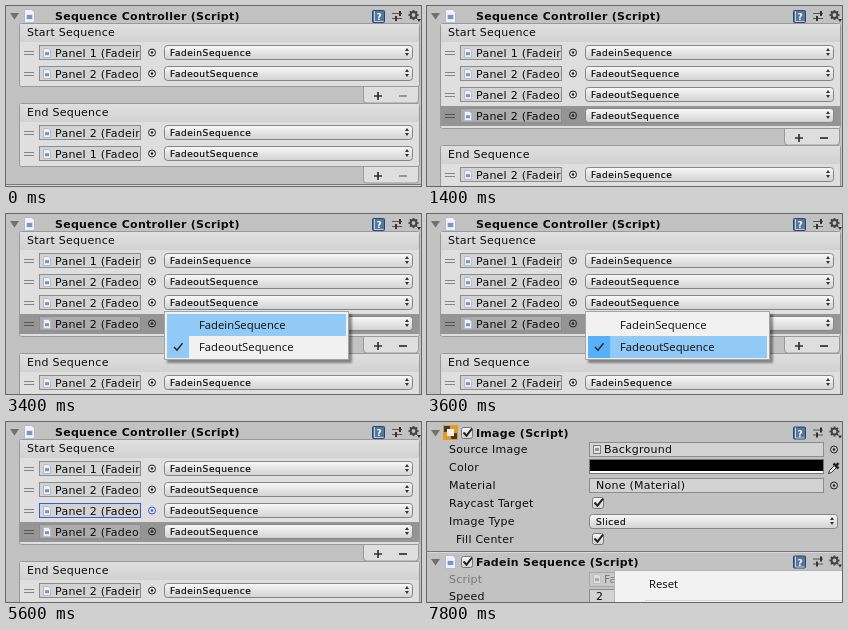
Recreate the animation shown at these times as an HTML page. Size 415 by 180 pixels, loop 8 s.

```html
<!DOCTYPE html>
<html lang="en">
<head>
<meta charset="utf-8">
<title>Sequence inspector</title>
<style>
  html, body { margin: 0; width: 415px; height: 180px; overflow: hidden; background: #c2c2c2; }
  svg { display: block; width: 415px; height: 180px; }
  text { font: 11px "DejaVu Sans", sans-serif; letter-spacing: .25px; fill: #0c0c0c; white-space: pre; }
  .bold { font-weight: bold; letter-spacing: .28px; }
  .small { font-size: 9px; letter-spacing: .55px; stroke: #0c0c0c; stroke-width: .2px; }
  .menu { font: 11.3px "Open Sans", "Noto Sans", sans-serif; letter-spacing: 0; }
  .dim { fill: #777; }
</style>
</head>
<body>
<svg id="stage" viewBox="0 0 415 180" xmlns="http://www.w3.org/2000/svg">
  <defs>
    <linearGradient id="button" x2="0" y2="1">
      <stop offset="0" stop-color="#f8f8f8"/><stop offset="1" stop-color="#d2d2d2"/>
    </linearGradient>
    <linearGradient id="header" x2="0" y2="1">
      <stop offset="0" stop-color="#dfdfdf"/><stop offset="1" stop-color="#d2d2d2"/>
    </linearGradient>
    <clipPath id="fieldClip"><rect x="33" y="0" width="100.5" height="16"/></clipPath>
    <filter id="shadow" x="-10%" y="-20%" width="125%" height="150%">
      <feDropShadow dx="3" dy="3" stdDeviation="1.3" flood-opacity=".4"/>
    </filter>
  </defs>
  <g id="view"></g>
</svg>
<script>
const LOOP = 8000;
const view = document.getElementById('view');

// Each step holds from its time until the next one.
const steps = [
  [0, { rows: 2 }],
  [900, { rows: 3 }],
  [1400, { rows: 4 }],
  [3100, { rows: 4, popup: .7 }],
  [3200, { rows: 4, popup: 1 }],
  [3400, { rows: 4, popup: 1, hover: 0 }],
  [3500, { rows: 4, popup: 1 }],
  [3600, { rows: 4, popup: 1, hover: 1 }],
  [3900, { rows: 4, popup: 1, hover: 0 }],
  [4200, { rows: 4, popup: 1 }],
  [5600, { rows: 4, ping: 2 }],
  [6400, { component: true }],
  [7600, { component: true, context: .4 }],
  [7700, { component: true, context: .8 }],
  [7800, { component: true, context: 1 }]
];

const at = (x, y, body, extra = '') => `<g transform="translate(${x} ${y})" ${extra}>${body}</g>`;
const text = (x, y, s, cls = '') => `<text x="${x}" y="${y}" class="${cls}">${s}</text>`;
const rect = (x, y, w, h, fill, extra = '') =>
  `<rect x="${x}" y="${y}" width="${w}" height="${h}" fill="${fill}" ${extra}/>`;
const box = (x, y, w, h, fill, stroke, r = 0) =>
  rect(x + .5, y + .5, w - 1, h - 1, fill, `stroke="${stroke}" rx="${r}"`);
const path = (d, stroke, width = 1, fill = 'none') =>
  `<path d="${d}" stroke="${stroke}" stroke-width="${width}" fill="${fill}"/>`;

const foldout = (x, y) => path(`M${x} ${y}h9l-4.5 6.5z`, 'none', 0, '#707070');
const picker = (x, y, color = '#222') =>
  `<circle cx="${x}" cy="${y}" r="3.5" fill="none" stroke="${color}"/>` +
  `<circle cx="${x}" cy="${y}" r="1.2" fill="${color}"/>`;
const check = (x, y, color, width = 2) => path(`M${x} ${y}l3 3.2l5.5 -7`, color, width);

function page(x, y, w, h) {
  const s = w / 4;
  return path(`M${x + .5} ${y + .5}h${w - s - 1}l${s} ${s}v${h - s - 1}h${1 - w}z`, '#b4bcc6', 1, '#eef1f5') +
    rect(x + w * .25, y + h * .42, w * .5, h * .3, '#7398c4');
}

function toggle(x, y) {
  return box(x, y, 12, 12, 'url(#button)', '#777', 2) + check(x + 2.5, y + 5.5, '#222');
}

function popupButton(x, y, w, label, indent) {
  const ax = x + w - 6, ay = y + 7;
  return box(x, y, w, 15, 'url(#button)', '#858585', 3) +
    text(x + indent, y + 11, label, 'small') +
    path(`M${ax - 2} ${ay - 1}h4l-2 -3zM${ax - 2} ${ay + 1}h4l-2 3z`, 'none', 0, '#333');
}

// Help book, preset sliders and gear at the right of a component header.
function tools(y) {
  const gy = y - 1;
  let gear = `<circle cx="407.5" cy="${gy}" r="2.9" fill="none" stroke="#444" stroke-width="2"/>`;
  for (let a = 0; a < 8; a++) {
    gear += rect(406.6, gy - 5, 1.8, 2, '#444', `transform="rotate(${a * 45} 407.5 ${gy})"`);
  }
  return box(366, y - 6, 13, 13, '#54779f', '#2c4768', 1) +
    path(`M368.5 ${y - 5}v10.5h9`, '#c3d3e5') +
    `<text x="370.5" y="${y + 4}" style="font:bold 9px 'DejaVu Sans',sans-serif;fill:#fff">?</text>` +
    path(`M386 ${y - 2.5}h10M386 ${y + 2.5}h10`, '#555') +
    rect(393, y - 5, 2, 5, '#333') + rect(389, y, 2, 5, '#333') +
    gear + path(`M411 ${y + 3}h4l-2 3z`, 'none', 0, '#333');
}

function listRow(y, panel, kind, selected, ping) {
  const edge = ping ? '#315fe0' : '#8c8c8c';
  const grip = selected ? '#555' : '#858585';
  const name = `Panel ${panel} (Fade${kind} Sequence)`;
  return at(0, y,
    (selected ? rect(14, 0, 399, 20, '#959595') : '') +
    path('M18 8.5h10M18 11.5h10', grip) +
    box(33, 2, 102, 15, selected ? '#acacac' : '#d3d3d3', edge) +
    page(37, 5, 8, 10) +
    at(0, 2, text(49, 12, name), 'clip-path="url(#fieldClip)"') +
    picker(146, 9.5, ping ? '#315fe0' : '#222') +
    popupButton(158, 2, 249, `Fade${kind}Sequence`, 6));
}

function list(y, title, rows, selected = -1, ping = -1) {
  const end = 21 + rows.length * 21;
  const body = rows.map(([panel, kind], i) =>
    listRow(20 + i * 21, panel, kind, i === selected, i === ping)).join('');
  return at(0, y,
    path(`M357.5 ${end}v14q0 3 3 3h49q3 0 3 -3v-14`, '#999', 1, '#dedede') +
    box(13, 0, 401, end + 1, '#dfdfdf', '#999', 2) +
    rect(14, 1, 399, 18, 'url(#header)') +
    text(21, 13, title) + body +
    path(`M368 ${end + 10}h8M372 ${end + 6}v8`, '#333', 1.7) +
    path(`M393 ${end + 10}h8`, selected < 0 ? '#8c8c8c' : '#333', 1.7));
}

function sequenceView({ rows, ping }) {
  const start = [[1, 'in'], [2, 'out'], [2, 'out'], [2, 'out']].slice(0, rows);
  const shift = (rows - 2) * 21;
  return foldout(4, 7) + page(18, 3, 11, 14) +
    text(49, 14, 'Sequence Controller (Script)', 'bold') + tools(10) +
    list(17, 'Start Sequence', start, rows > 2 ? rows - 1 : -1, ping) +
    list(97 + shift, 'End Sequence', [[2, 'in'], [1, 'out']]) +
    rect(0, 178 + shift, 415, 1, '#777') + rect(0, 179 + shift, 415, 1, '#d9d9d9');
}

function choiceMenu(opacity, hover) {
  const items = ['FadeinSequence', 'FadeoutSequence'].map((label, i) => {
    const y = 100 + i * 22, lit = i === hover;
    return (lit ? rect(161, y, 179, 22, '#91c9f7') : '') +
      (i ? rect(161, y, 22, 22, lit ? '#56b0fa' : '#91c9f7') + check(168, y + 11, '#222', 1.4) : '') +
      text(193, y + 15, label, 'menu');
  }).join('');
  return `<g opacity="${opacity}">` +
    `<g filter="url(#shadow)">${box(158, 97, 185, 49, '#f1f1f1', '#a5a5a5')}</g>${items}</g>`;
}

function contextMenu(opacity) {
  return `<g opacity="${opacity}">` + box(187, 148, 240, 60, '#f2f2f2', '#b4b4b4') +
    text(222, 166, 'Reset', 'menu') + rect(218, 178, 197, 1, '#d5d5d5') + '</g>';
}

function field(y, label, value, icon = '', dim = '', w = 235) {
  return text(22, y + 4, label, dim) +
    box(162, y - 7, w, 15, dim ? '#c9c9c9' : '#d3d3d3', dim ? '#aaa' : '#8c8c8c') + icon +
    text(icon ? 177 : 169, y + 4, value, dim) +
    (w < 240 ? picker(407, y + .5, dim ? '#777' : '#222') : '');
}

function componentView() {
  const spriteIcon = box(166, 23, 8, 9, '#e5e5e5', '#7d7d7d') + rect(168, 26, 4, 3, '#8b98a5');
  const imageIcon = rect(16, 3, 15, 15, '#e79a27') + rect(17, 4, 6, 6, '#3d3d3d') +
    rect(24, 11, 6, 6, '#3d3d3d') + rect(20, 7, 7, 7, '#f6f1e6');
  const dropper = path('M401.5 51.5l1 -3l5.5 -5.5l2 2l-5.5 5.5z', '#333', 1, '#eee') +
    path('M406.5 41.5l5 5M409 44l2.5 -3', '#222', 2.5);
  return foldout(4, 8) + imageIcon + toggle(34, 5) +
    text(49, 15, 'Image (Script)', 'bold') + tools(10.5) +
    field(27, 'Source Image', 'Background', spriteIcon) +
    text(22, 49, 'Color') + box(162, 37, 235, 15, '#000', '#777') + rect(163, 49, 233, 2, '#fff') + dropper +
    field(63, 'Material', 'None (Material)') +
    text(22, 85, 'Raycast Target') + toggle(165, 75) +
    text(22, 103, 'Image Type') + popupButton(162, 92, 249, 'Sliced', 7) +
    text(29, 121, 'Fill Center') + toggle(165, 111) +
    rect(0, 129, 415, 1, '#777') + rect(0, 130, 415, 1, '#d9d9d9') +
    foldout(4, 137) + page(18, 133, 11, 14) + toggle(34, 134) +
    text(49, 144, 'Fadein Sequence (Script)', 'bold') + tools(139.5) +
    field(157, 'Script', 'FadeinSequence', `<g opacity=".6">${page(166, 152, 8, 10)}</g>`, 'dim') +
    field(174, 'Speed', '2', '', '', 251);
}

function draw(state) {
  view.innerHTML = (state.component ? componentView() : sequenceView(state)) +
    (state.popup ? choiceMenu(state.popup, state.hover) : '') +
    (state.context ? contextMenu(state.context) : '');
}

let shown;
function tick() {
  const t = performance.now() % LOOP;
  const state = steps.findLast(([start]) => start <= t)[1];
  if (state !== shown) draw(shown = state);
  requestAnimationFrame(tick);
}
tick();
</script>
</body>
</html>
```
